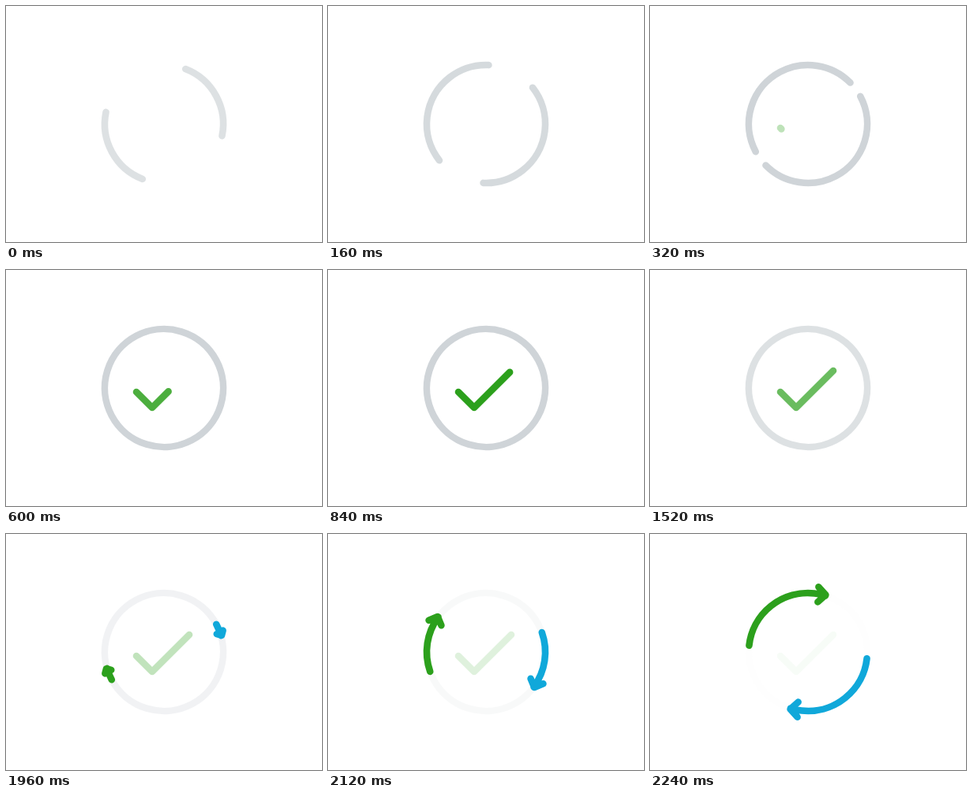
Write an HTML page with a canvas that moves like this. It is 400x300 px and loops after 2280 ms.

```html
<!DOCTYPE html>
<html>
<head>
<meta charset="utf-8">
<style>
html, body { margin: 0; width: 100%; height: 100%; overflow: hidden; background: #fff; }
canvas { display: block; }
</style>
</head>
<body>
<canvas width="400" height="300"></canvas>
<script>
const ctx = document.querySelector('canvas').getContext('2d');
const LOOP = 2280, R = 75, REST = -28;
const GREY = '#cfd4d8', GREEN = '#2ca01c', BLUE = '#10a8da';
const rad = d => d * Math.PI / 180;
const ramp = (t, from, to) => Math.min(1, Math.max(0, (t - from) / (to - from)));

// Cubic bezier easing with flat ends, handles at x1 and x2
function ease(x, x1, x2) {
  let lo = 0, hi = 1;
  for (let i = 0; i < 24; i++) {
    const s = (lo + hi) / 2, r = 1 - s;
    if (3 * r * r * s * x1 + 3 * r * s * s * x2 + s * s * s < x) lo = s; else hi = s;
  }
  return lo * lo * (3 - 2 * lo);
}

function stroke(color, alpha, path) {
  ctx.globalAlpha = alpha;
  ctx.strokeStyle = color;
  ctx.beginPath();
  path();
  ctx.stroke();
}

function arc(from, to) {
  ctx.moveTo(R * Math.cos(rad(from)), R * Math.sin(rad(from)));
  ctx.arc(0, 0, R, rad(from), rad(to));
}

function ring(t, fade) {
  const tail = REST - 41 * (1 - ramp(t, 0, 320)) ** 2;
  const span = 180 - 100 * (1 - ramp(t, 0, 540)) ** 2;
  stroke(GREY, fade * (0.7 + 0.3 * ramp(t, 0, 300)), () => {
    arc(tail, tail + span);
    arc(tail + 180, tail + 180 + span);
  });
}

function check(t, fade) {
  if (t < 267) return;
  const len = 67 * ease(ramp(t, 267, 935), 0.33, 0.5);  // horizontal extent drawn
  const down = Math.min(len, 20), up = Math.max(0, len - 20);
  stroke(GREEN, fade * ramp(t, 160, 680), () => {
    ctx.moveTo(-35, 5);
    ctx.lineTo(-35 + down, 5 + down);
    if (up) ctx.lineTo(-15 + up, 25 - up);
  });
}

function arrow(t, color, turn) {
  const head = REST + 139 * ease(ramp(t, 1780, 2280), 0.83, 0.7) + turn;
  const tail = REST + 34 * (Math.max(0, t - 2000) / 240) ** 2 + turn;
  const barb = 13.5 * ramp(t, 1780, 2160);
  const x = 76 * Math.cos(rad(head)), y = 76 * Math.sin(rad(head));
  const back = head - 90 - 14;
  const wing = a => [x + barb * Math.cos(rad(back + a)), y + barb * Math.sin(rad(back + a))];
  stroke(color, 1, () => {
    arc(tail, head);
    ctx.moveTo(...wing(-45));
    ctx.lineTo(x, y);
    ctx.lineTo(...wing(45));
  });
}

function draw(now) {
  const t = now % LOOP, fade = 1 - ramp(t, 1200, LOOP);
  ctx.setTransform(1, 0, 0, 1, 0, 0);
  ctx.clearRect(0, 0, 400, 300);
  ctx.translate(200, 150);
  ctx.lineWidth = 8.6;
  ctx.lineCap = ctx.lineJoin = 'round';
  ring(t, fade);
  check(t, fade);
  if (t > 1780) {
    arrow(t, BLUE, 0);
    arrow(t, GREEN, 180);
  }
}

const start = performance.now();
function tick() {
  draw(performance.now() - start);
  requestAnimationFrame(tick);
}
tick();
</script>
</body>
</html>
```
